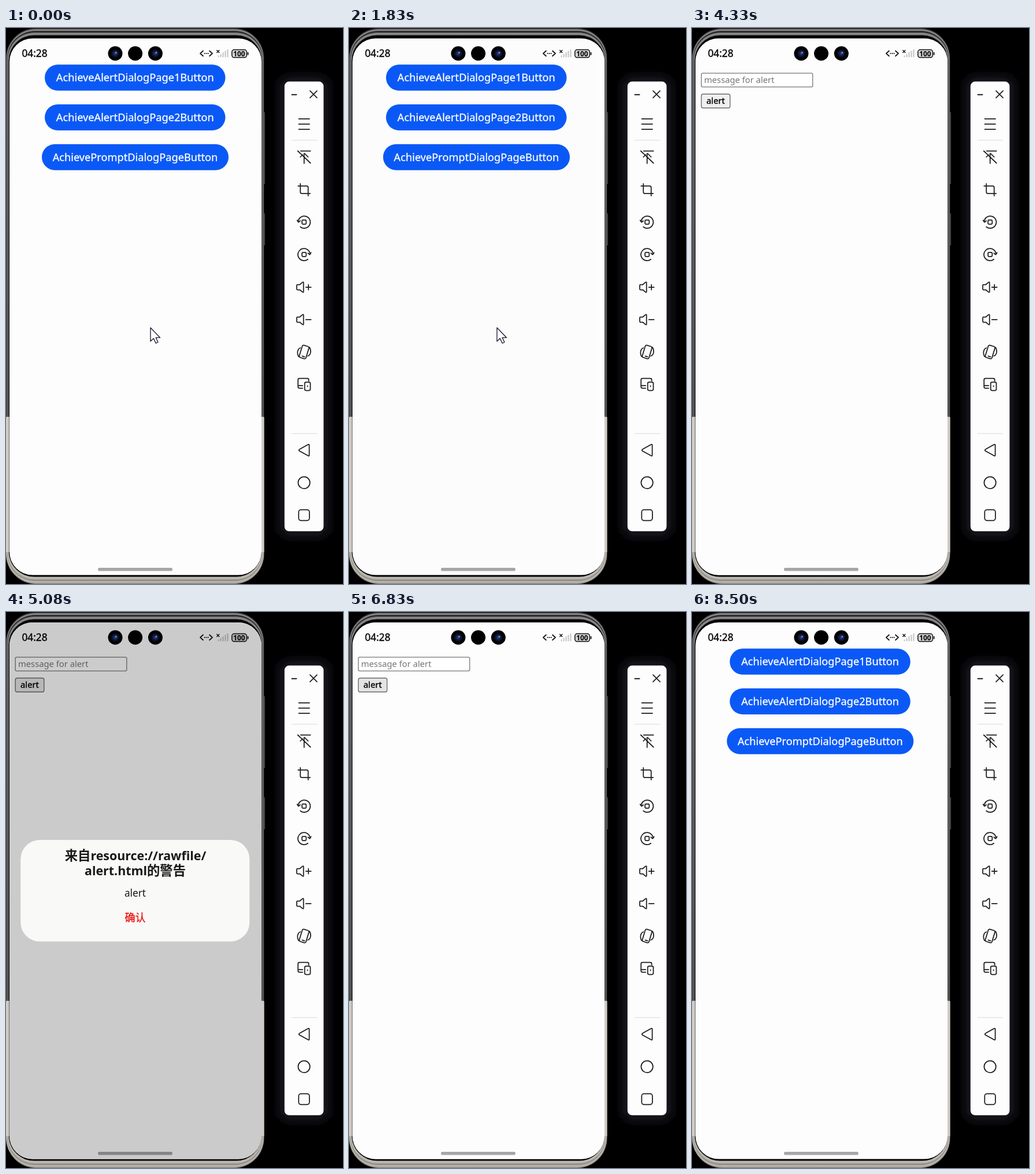
An HTML page for the animation above (8.58 s loop, 583 px wide and 961 px high).

```html
<!DOCTYPE html>
<html lang="zh-CN">
<head>
<meta charset="utf-8">
<title>Alert dialog demo</title>
<style>
  html, body { margin: 0; width: 100%; height: 100%; overflow: hidden; background: #000; }
  svg { display: block; width: 100vw; height: 100vh; }
  text { font-family: "Noto Sans", "Noto Sans CJK SC", "Noto Sans CJK", sans-serif; }
  .mid { text-anchor: middle; }
  .firm { stroke: #000; stroke-width: .35; }
  .pill { fill: #0a59f7; }
  .label { fill: #fff; stroke: #fff; stroke-width: .3; font-size: 18.2px; }
  .web { font-size: 14.75px; }
  .title { font-size: 21.4px; font-weight: 700; }
  .title tspan { font-size: 22.3px; }
  .icons { fill: none; stroke: #1c1c1c; stroke-width: 1.75; stroke-linecap: round; stroke-linejoin: round; }
  .rule { stroke: #dadae2; stroke-width: 1.2; }
</style>
</head>
<body>
<svg viewBox="0 0 583 961" preserveAspectRatio="none">
  <defs>
    <linearGradient id="metal" gradientUnits="userSpaceOnUse" x1="0" y1="0" x2="0" y2="961">
      <stop offset="0" stop-color="#858585"/>
      <stop offset=".699" stop-color="#6c6c6c"/>
      <stop offset=".699" stop-color="#cfcbc4"/>
      <stop offset="1" stop-color="#b9b5ae"/>
    </linearGradient>
    <linearGradient id="groove" gradientUnits="userSpaceOnUse" x1="0" y1="0" x2="0" y2="961">
      <stop offset=".699" stop-color="#2c2c2c"/>
      <stop offset=".699" stop-color="#938f89"/>
    </linearGradient>
    <radialGradient id="lens">
      <stop offset="0" stop-color="#34468c"/>
      <stop offset=".5" stop-color="#101a42"/>
      <stop offset="1" stop-color="#030306"/>
    </radialGradient>
    <filter id="blur" x="-50%" y="-10%" width="200%" height="120%"><feGaussianBlur stdDeviation="10"/></filter>
    <clipPath id="screen"><rect x="6" y="18" width="436" height="927.5" rx="40"/></clipPath>
  </defs>

  <rect width="583" height="961"/>

  <!-- phone body -->
  <g fill="#4c4c4c">
    <rect x="444" y="145" width="4" height="125" rx="1.5"/>
    <rect x="444" y="320" width="4" height="56" rx="1.5"/>
  </g>
  <rect width="446.5" height="961" rx="52" fill="url(#groove)"/>
  <rect x="1" y="2" width="444.5" height="957" rx="50" fill="url(#metal)"/>
  <rect x="2.2" y="5" width="442" height="951" rx="48" fill="url(#groove)"/>
  <rect x="3" y="8" width="440.6" height="945" rx="46" fill="url(#metal)"/>
  <rect x="4.6" y="12.5" width="437.8" height="936" rx="44"/>
  <path d="M0 674q0 -2 2 -2h3.5v234h-5.5zM441.5 672h3q2 0 2 2v232h-5z" fill="#cfcbc4"/>

  <g clip-path="url(#screen)">
    <rect x="5" y="17" width="438" height="930" fill="#fdfdfd"/>
    <g id="home">
      <rect class="pill" x="67" y="63.3" width="312.5" height="45" rx="22.5"/>
      <rect class="pill" x="67" y="132" width="312.5" height="45" rx="22.5"/>
      <rect class="pill" x="62" y="200.7" width="323" height="45" rx="22.5"/>
      <g class="label mid">
        <text x="223.3" y="92.3">AchieveAlertDialogPage1Button</text>
        <text x="223.3" y="161">AchieveAlertDialogPage2Button</text>
        <text x="223.5" y="229.7">AchievePromptDialogPageButton</text>
      </g>
    </g>
    <rect id="shade" x="5" y="17" width="438" height="930" opacity="0"/>

    <g id="page">
      <rect x="5" y="17" width="438" height="930" fill="#fdfdfd"/>
      <g id="content" class="web">
        <rect x="16.2" y="78.2" width="192.6" height="23.6" rx="2" fill="#fff" stroke="#767676" stroke-width="1.3"/>
        <text x="21" y="95.3" fill="#757575">message for alert</text>
        <rect id="button" x="16.2" y="114.2" width="49.6" height="24" rx="3" fill="#efefef" stroke="#6b6b6b" stroke-width="1.4"/>
        <text class="mid firm" x="41" y="131.3">alert</text>
      </g>
    </g>

    <!-- status bar -->
    <text class="firm" x="27.4" y="50" font-size="17.3">04:28</text>
    <g fill="none" stroke="#111" stroke-width="1.7" stroke-linecap="round" stroke-linejoin="round">
      <path d="M341 39.5L336 44L341 48.5M352 39.5L357 44L352 48.5"/>
      <path d="M343.6 44h.1M346.6 44h.1M349.6 44h.1" stroke-width="2"/>
      <path d="M364.8 38.5l4 4m0-4l-4 4" stroke-width="1.5"/>
      <rect x="390.8" y="37.5" width="25.6" height="13.6" rx="4" fill="#d2d2d2" stroke-width="1.5"/>
      <path d="M418.6 42.6v3.4" stroke-width="1.8"/>
    </g>
    <path d="M367.5 47.5v3m4-5.5v5.5m4-8.5v8.5m4-11v11m4-13.5v13.5" stroke="#c3c3c3" stroke-width="2"/>
    <text class="mid" x="403.4" y="48.6" font-size="11.8" font-weight="800">100</text>
    <rect x="159" y="933" width="129" height="5.6" rx="2.8" fill="#a6a6a6"/>

    <rect id="scrim" x="5" y="17" width="438" height="930" opacity="0"/>
    <g id="dialog" class="mid" opacity="0">
      <rect x="25.3" y="394" width="396" height="175.5" rx="33" fill="#f9f9f8"/>
      <g fill="#181818">
        <text class="title" x="224" y="429"><tspan>来自</tspan>resource://rawfile/</text>
        <text class="title" x="223.5" y="455.3">alert.html<tspan>的警告</tspan></text>
        <text x="223.5" y="492" font-size="17.2">alert</text>
      </g>
      <text x="223.5" y="534.6" font-size="18" fill="#e8120c" stroke="#e8120c" stroke-width=".3">确认</text>
    </g>

    <g>
      <circle cx="189" cy="44" r="12.5"/>
      <circle cx="223.6" cy="44" r="12.5"/>
      <circle cx="258.4" cy="44" r="12.5"/>
      <circle cx="189" cy="44" r="8" fill="url(#lens)"/>
      <circle cx="258.4" cy="44" r="8" fill="url(#lens)"/>
      <circle cx="190.5" cy="42.5" r="1.5" fill="#7488d0"/>
      <circle cx="260" cy="42.5" r="1.5" fill="#7488d0"/>
    </g>
  </g>

  <!-- emulator toolbar -->
  <rect x="474" y="85" width="83" height="793" rx="14" fill="#1c1c26" filter="url(#blur)"/>
  <rect x="481.8" y="92.6" width="67.6" height="777.2" rx="8" fill="#fdfdfd"/>
  <path class="rule" d="M494 194h44.5M494 701h44.5"/>
  <g class="icons">
    <path d="M494.5 115.3h8" stroke-width="2"/>
    <path d="M526 108.7l12 12m0-12l-12 12"/>
    <path d="M506.5 157h18.5m-18.5 9h18.5m-18.5 9h18.5"/>
    <g transform="translate(515.7 223)">
      <path d="M-6 -10.5H11M0 -6V11M-6.5 0L-2.5 -4M1 -6L7 0M-11 -10.5L11 10.5"/>
    </g>
    <g transform="translate(515.7 279.5)">
      <path d="M-10.5 -6.5H4.5Q7 -6.5 7 -4V10.5M-6.5 -10.5V4Q-6.5 6.5 -4 6.5H10.5"/>
    </g>
    <g id="turn" transform="translate(515.7 335.5)">
      <path d="M-10 -2.5A10.5 10.5 0 1 1 -6.5 8.2M-12 -3.2L-9.8 .2L-6.6 -2.2"/>
      <rect x="-3.6" y="-3.6" width="7.2" height="7.2" rx="1.6"/>
    </g>
    <use href="#turn" transform="translate(1031.4 56) scale(-1 1)"/>
    <g id="speaker" transform="translate(515.7 448)">
      <path d="M-11.5 -4.5H-7.5L-2.5 -8.6Q-1 -9.4 -1 -7.6V7.6Q-1 9.4 -2.5 8.6L-7.5 4.5H-11.5Q-12.7 4.5 -12.7 3.3V-3.3Q-12.7 -4.5 -11.5 -4.5ZM3 0H12"/>
    </g>
    <path d="M523.2 443.5v9"/>
    <use href="#speaker" y="56"/>
    <g transform="translate(515.7 560)">
      <rect x="-6" y="-11" width="12" height="22" rx="2.5" transform="rotate(17)"/>
      <path d="M-3.2 7.2L.8 8.4M-6.5 -7C-12 -5 -12.5 3 -9.5 8M6.5 7C12 5 12.5 -3 9.5 -8"/>
    </g>
    <g transform="translate(515.7 616)">
      <path d="M8 -6V-8Q8 -10.5 5.5 -10.5H-8Q-10.5 -10.5 -10.5 -8V4Q-10.5 6.5 -8 6.5H-2.5M-10.5 2H-2.5"/>
      <rect x="1" y="-4" width="9.8" height="14.5" rx="2.4"/>
      <path d="M5.9 2.5v1"/>
    </g>
    <path d="M523 719.8L507.5 728.4Q506 729.7 507.5 731L523 739.4Q524.6 740 524.6 738.3V721Q524.6 719.3 523 719.8Z"/>
    <circle cx="515.6" cy="785.8" r="10.2"/>
    <rect x="506.3" y="832.7" width="18.6" height="18.6" rx="4"/>
  </g>

  <path id="cursor" d="M0 0V23.5L5.3 18.6L9.2 26.8L13 25L9.2 17.2H16.6Z"
        fill="#fff" stroke="#15152e" stroke-width="1.3" stroke-linejoin="round"/>
</svg>

<script>
  const LOOP = 8580, STEP = LOOP / 103;
  const PUSH = 1817, LOADED = 2250, POP = 8180;
  const DIALOG_IN = 4750, DIALOG_OUT = 6350;
  const WIDTH = 437, PARALLAX = 87;

  const el = Object.fromEntries([...document.querySelectorAll('[id]')].map(e => [e.id, e]));
  const clamp = v => Math.min(1, Math.max(0, v));
  const ease = v => v * v * (3 - 2 * v);
  const ramp = (t, from, to) => ease(clamp((t - from) / (to - from)));
  const move = (e, x, y = 0) => e.setAttribute('transform', `translate(${x} ${y})`);
  const fade = (e, v) => e.setAttribute('opacity', v);

  // Critically damped spring, 0 to 1
  const spring = (t, start) => {
    const x = Math.max(0, t - start) * 0.0185;
    return 1 - (1 + x) * Math.exp(-x);
  };

  function render(t) {
    const open = spring(t, PUSH) - spring(t, POP);
    move(el.home, -PARALLAX * open);
    fade(el.shade, 0.1 * open);
    move(el.page, WIDTH * (1 - open));
    el.page.style.display = t < PUSH ? 'none' : '';
    fade(el.content, t < LOADED ? 0 : 1);
    el.button.setAttribute('fill', t < DIALOG_IN ? '#efefef' : '#e4e4e4');

    const shown = ramp(t, DIALOG_IN, DIALOG_IN + 220) - ramp(t, DIALOG_OUT, DIALOG_OUT + 220);
    const size = 0.85 + 0.15 * shown;
    fade(el.scrim, 0.2 * shown);
    fade(el.dialog, shown);
    el.dialog.setAttribute('transform',
      `translate(223.3 482) scale(${size}) translate(-223.3 -482)`);

    const x = 250 + 6 * ramp(t, 1300, 1800) + 94 * ramp(t, 1850, 2660) + 250 * ramp(t, 2700, 3500);
    move(el.cursor, x, 518 + ramp(t, 1850, 2660));
    el.cursor.style.display = t < 3500 ? '' : 'none';
  }

  const begin = performance.now();
  function tick() {
    const t = (performance.now() - begin) % LOOP;
    render(Math.floor((t + 5) / STEP) % 103 * STEP);
    requestAnimationFrame(tick);
  }
  tick();
</script>
</body>
</html>
```
